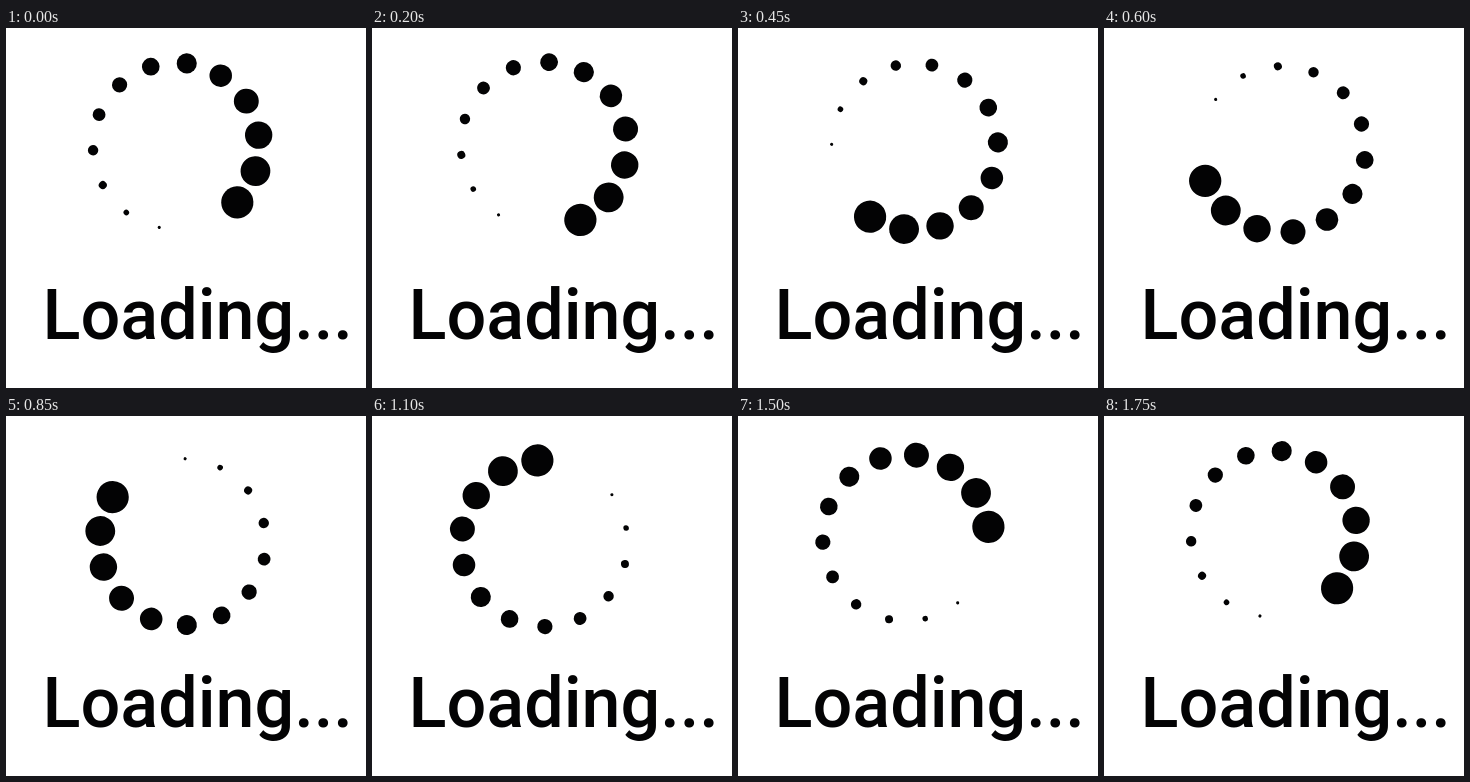
These frames come from a looping animation (360 px wide and 360 px high, 1800 ms). An HTML page:

```html
<!DOCTYPE html>
<html lang="en">
<head>
<meta charset="utf-8">
<title>Loading</title>
<style>
  html, body { margin: 0; width: 100%; height: 100%; overflow: hidden; background: #fff; }
  svg { display: block; width: 100%; height: 100%; }
  text { font: 500 70px Roboto, Arial, sans-serif; }
</style>
</head>
<body>
<svg viewBox="0 0 360 360" fill="#030304">
  <g id="ring"></g>
  <text x="36.5" y="311">Loading...</text>
</svg>
<script>
const LOOP = 1800, STEP = 50;
const DOTS = 13, GAP = 25.08, RADIUS = 83.2;
const PIVOT = { x: 173.1, y: 122.2 };
const OFFSET = { r: 5.2, angle: 193 };  // the ring sits slightly off its pivot

// [step, degrees]: speeds up, cruises, then brakes to a stop
const KEYS = [[0, 42.7], [4.4, 68.5], [7, 99], [12, 157.8], [17, 212.6],
              [22, 265.2], [30, 352.5], [33.3, 388.1], [36, 402.7]];

const ring = document.getElementById('ring');
const polar = (r, deg) => {
  const a = deg * Math.PI / 180;
  return { x: r * Math.cos(a), y: r * Math.sin(a) };
};

const center = polar(OFFSET.r, OFFSET.angle);
for (let i = 0; i < DOTS; i++) {
  const p = polar(RADIUS, -i * GAP);
  const dot = document.createElementNS('http://www.w3.org/2000/svg', 'circle');
  dot.setAttribute('cx', center.x + p.x);
  dot.setAttribute('cy', center.y + p.y);
  dot.setAttribute('r', 16.1 - 1.21 * i);
  ring.append(dot);
}

function angleAt(step) {
  const last = KEYS.length - 1;
  let i = 1;
  while (i < last && step > KEYS[i][0]) i++;
  const [s0, a0] = KEYS[i - 1], [s1, a1] = KEYS[i];
  let u = (step - s0) / (s1 - s0);
  if (i === 1) u = u * u;
  if (i === last) u = 1 - (1 - u) ** 2;
  return a0 + (a1 - a0) * u;
}

function draw(ms) {
  const step = Math.floor((ms % LOOP) / STEP);
  ring.setAttribute('transform', `translate(${PIVOT.x} ${PIVOT.y}) rotate(${angleAt(step)})`);
}

let start;
function tick(now) {
  start ??= now;
  draw(now - start);
  requestAnimationFrame(tick);
}
draw(0);
requestAnimationFrame(tick);
</script>
</body>
</html>
```
